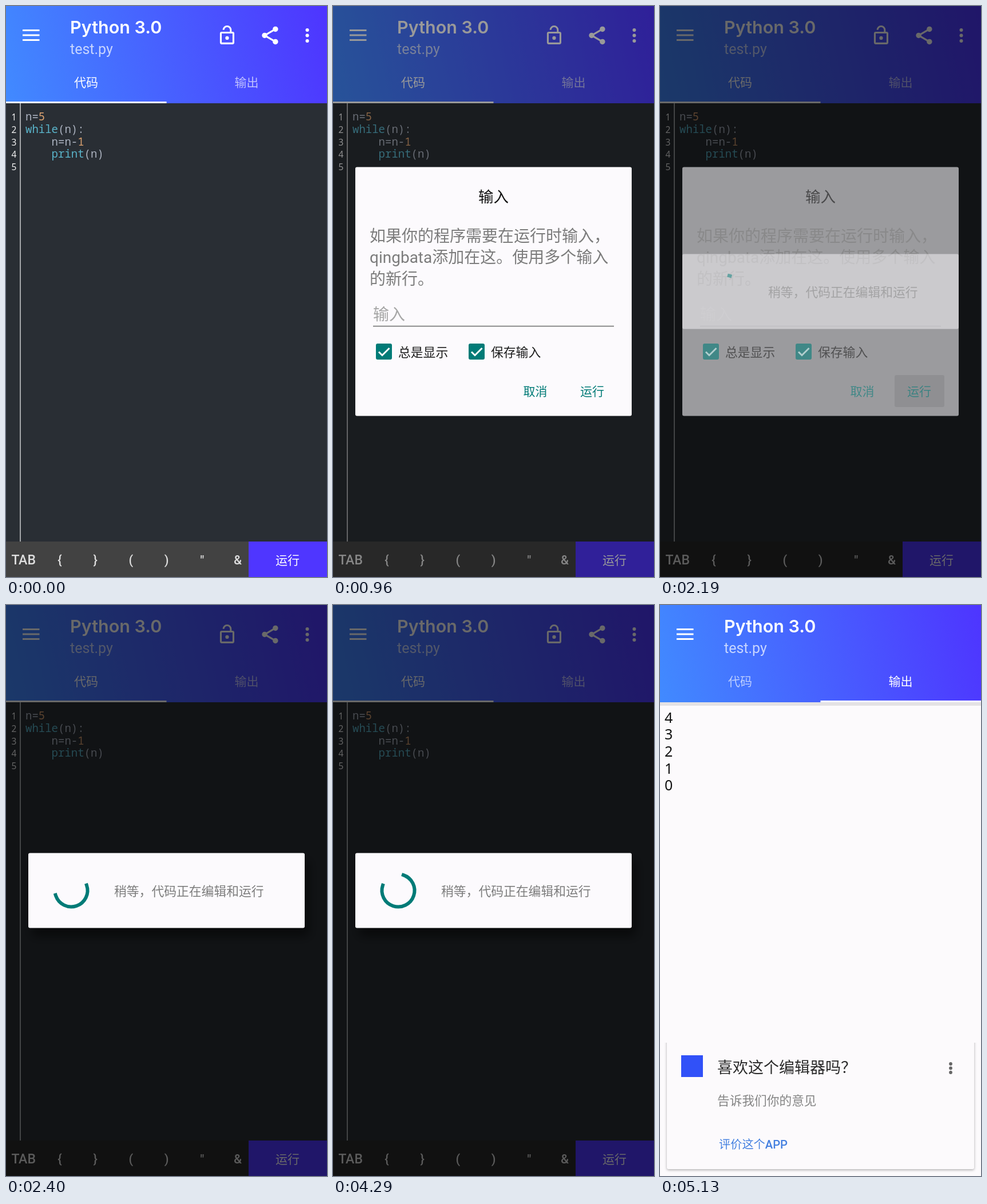
An HTML page with a canvas for the animation above (5.6 s loop, 561 by 998 pixels).

```html
<!DOCTYPE html>
<html lang="zh-CN">
<head>
<meta charset="utf-8">
<style>
  html, body { margin: 0; width: 561px; height: 998px; overflow: hidden; background: #292e34; }
  canvas { display: block; }
</style>
</head>
<body>
<canvas id="stage" width="561" height="998"></canvas>
<script>
const ctx = document.getElementById('stage').getContext('2d');
const W = 561, H = 998, LOOP = 5600, BAR = 170, TOOLS = 936;
const CJK = "Roboto, 'Noto Sans CJK SC', sans-serif";
const MONO = "'Noto Sans Mono', monospace";
const TEAL = '#007b77', WHITE = '#fff', PLAIN = '#abb2bf', KEY = '#5ab4ca', NUM = '#dba270';

const CODE = [
  [['n=', PLAIN], ['5', NUM]],
  [['while', KEY], ['(n):', PLAIN]],
  [['    n=n-', PLAIN], ['1', NUM]],
  [['    ', PLAIN], ['print', KEY], ['(n)', PLAIN]],
  []
];

const clamp = x => Math.max(0, Math.min(1, x));
const ramp = (t, from, to) => clamp((t - from) / (to - from));

// The picture is updated in 70 ms steps inside these spans and rests between them.
const SPANS = [[0, 0], [400, 680], [820, 820], [960, 960], [1090, 1160], [1710, 2130], [2260, 5130]];
function step(t) {
  const [start, end] = SPANS.filter(s => s[0] <= t).pop();
  return start + 70 * Math.floor((Math.min(t, end) - start) / 70);
}

function text(str, x, y, font, color, align = 'left') {
  ctx.font = font;
  ctx.fillStyle = color;
  ctx.textAlign = align;
  ctx.fillText(str, x, y);
}

function box(x, y, w, h, color, r = 0) {
  ctx.fillStyle = color;
  ctx.beginPath();
  ctx.roundRect(x, y, w, h, r);
  ctx.fill();
}

function dot(x, y, r, color) {
  ctx.fillStyle = color;
  ctx.beginPath();
  ctx.arc(x, y, r, 0, Math.PI * 2);
  ctx.fill();
}

function line(points, color, width) {
  ctx.strokeStyle = color;
  ctx.lineWidth = width;
  ctx.beginPath();
  points.forEach(p => ctx.lineTo(...p));
  ctx.stroke();
}

function withState(draw) {
  ctx.save();
  draw();
  ctx.restore();
}

function ripple(x, y, w, h, grow, color) {
  withState(() => {
    ctx.beginPath();
    ctx.roundRect(x, y, w, h, 3);
    ctx.clip();
    dot(x + w / 2, y + h / 2, Math.hypot(w, h) / 2 * grow, color);
  });
}

function lockIcon() {
  withState(() => {
    ctx.translate(367.6, 32.4);
    ctx.scale(1.57, 1.57);
    ctx.strokeStyle = WHITE;
    ctx.lineWidth = 2;
    ctx.beginPath();
    ctx.roundRect(5, 9, 14, 12, 1);
    ctx.stroke();
    dot(12, 15, 2, WHITE);
    ctx.lineWidth = 1.9;
    ctx.beginPath();
    ctx.moveTo(16.05, 9);
    ctx.lineTo(16.05, 6);
    ctx.arc(12, 6, 4.05, 0, Math.PI, true);
    ctx.stroke();
  });
}

function shareIcon() {
  withState(() => {
    ctx.translate(442.6, 32.6);
    ctx.scale(1.57, 1.57);
    const nodes = [[18, 5], [6, 12], [18, 19]];
    line(nodes, WHITE, 2);
    nodes.forEach(([x, y]) => dot(x, y, 3, WHITE));
  });
}

function header(slide) {
  const g = ctx.createLinearGradient(0, BAR, 570, 45);
  g.addColorStop(0, '#418aff');
  g.addColorStop(1, '#4e35ff');
  box(0, 0, W, BAR, g);

  for (const y of [41, 49.5, 58]) box(29, y, 29.5, 3, WHITE);
  text('Python 3.0', 112, 48, '600 30.5px Inter, sans-serif', WHITE);
  text('test.py', 112, 83.5, '25px Roboto, sans-serif', 'rgba(255,255,255,.7)');
  const tab = on => `rgba(255,255,255,${0.65 + 0.35 * on})`;
  text('代码', 140, 141, '500 21px ' + CJK, tab(1 - slide), 'center');
  text('输出', 420.5, 141, '500 21px ' + CJK, tab(slide), 'center');
  box(280.5 * slide, 167, 280.5, 3, WHITE);
  if (slide > 0) return;
  lockIcon();
  shareIcon();
  for (const y of [42, 51.5, 61]) dot(526.5, y, 3, WHITE);
}

function codePage(t, settled) {
  box(0, BAR, W, H - BAR, '#292e34');
  box(24.2, BAR, 1.6, TOOLS - BAR, '#c4c6c8');
  CODE.forEach((parts, i) => {
    const y = 200 + 21.8 * i;
    text(i + 1, 14, y, "15.5px 'Noto Sans', sans-serif", '#f0f0f0', 'center');
    let x = 34;
    for (const [str, color] of parts) {
      text(str, x, y, '19px ' + MONO, color);
      x += ctx.measureText(str).width;
    }
  });

  box(0, TOOLS, W, H - TOOLS, settled ? '#292929' : '#424242');
  text('TAB', 9.5, 976, '500 23px ' + CJK, '#dedede');
  [...'{}()"&'].forEach((c, i) => text(c, 94 + 62.2 * i, 976, '500 22px ' + CJK, '#dedede', 'center'));
  box(424, TOOLS, 137, H - TOOLS, '#4f36ff');
  if (t >= 400 && t < 820) {
    const glow = 0.2 * (1 - ramp(t, 640, 820));
    ripple(424, TOOLS, 137, 62, 0.3 + 0.7 * ramp(t, 400, 610), `rgba(255,255,255,${glow})`);
  }
  text('运行', 492, 976, '500 21px ' + CJK, WHITE, 'center');
}

function outputPage() {
  box(0, BAR, W, H - BAR, '#fcfafc');
  box(0, BAR, W, 6, '#e4e2e4');
  for (let i = 0; i < 5; i++) {
    text(4 - i, 8, 205.5 + 29.7 * i, "25px 'Noto Sans', sans-serif", '#111');
  }
  withState(() => {
    ctx.beginPath();
    ctx.rect(0, 765, W, H - 765);
    ctx.clip();
    ctx.shadowColor = 'rgba(0,0,0,.32)';
    ctx.shadowBlur = 4;
    ctx.shadowOffsetY = 1.5;
    box(12, 755, 537, 231, '#fcfafc', 3);
  });
  box(37, 787, 38, 38, '#3151f8');
  text('喜欢这个编辑器吗？', 100, 818, '27px ' + CJK, '#2a2a2a');
  text('告诉我们你的意见', 100, 874, '21.7px ' + CJK, '#858585');
  text('评价这个APP', 103, 950, '500 20.2px ' + CJK, '#4480e0');
  for (const y of [802, 809.5, 817]) dot(508, y, 2.9, '#666');
}

function panel(height, shadow) {
  withState(() => {
    if (shadow) {
      ctx.shadowColor = 'rgba(0,0,0,.5)';
      ctx.shadowBlur = 18;
      ctx.shadowOffsetX = 7;
      ctx.shadowOffsetY = 14;
    }
    box(39, 499 - height / 2, 483, height, '#fcfafd', 3);
  });
}

function checkbox(x, label) {
  box(x, 590, 28, 28, TEAL, 3);
  line([[x + 5, 604.5], [x + 11, 610.5], [x + 23.5, 598]], WHITE, 3);
  text(label, x + 39, 613, '21.8px ' + CJK, '#1c1c1c');
}

function inputDialog(t) {
  panel(435, t >= 1160 && t <= 2060);
  text('输入', 280.5, 342.5, '26.5px ' + CJK, '#111', 'center');
  ['如果你的程序需要在运行时输入，', 'qingbata添加在这。使用多个输入', '的新行。'].forEach((str, i) =>
    text(str, 64, 412 + 37.3 * i, '28px ' + CJK, '#7c7c7c'));
  text('输入', 70, 548.5, '28px ' + CJK, '#a6a6a6');
  box(70, 558.8, 421, 1.6, '#7c7c7c');
  checkbox(75, '总是显示');
  checkbox(237, '保存输入');
  if (t >= 1710) ripple(410, 645, 87, 56, 0.3 + 0.7 * ramp(t, 1710, 1920), 'rgba(0,0,0,.13)');
  text('取消', 353.5, 681, '500 21px ' + CJK, TEAL, 'center');
  text('运行', 453, 681, '500 21px ' + CJK, TEAL, 'center');
}

// Solves a cubic curve with y running 0, 0, 1, 1 for a given x.
function curve(x, a, b, c, d) {
  let lo = 0, hi = 1, s = 0.5;
  for (let i = 0; i < 24; i++) {
    s = (lo + hi) / 2;
    const u = 1 - s;
    const at = a * u ** 3 + 3 * b * u * u * s + 3 * c * u * s * s + d * s ** 3;
    if (at < x) lo = s; else hi = s;
  }
  return s * s * (3 - 2 * s);
}

function spinner(t) {
  const turns = Math.max(0, 0.217 + (t - 2400) / 1465);
  const cycle = Math.floor(turns), p = turns - cycle;
  const tail = p < 0.5 ? 0 : curve(p, 0.5, 0.7, 0.6, 1);
  const head = p > 0.5 ? 1 : curve(p, 0, 0.2, 0.1, 0.5);
  const base = 4 + 308 * turns + 270 * cycle - 90;
  const rad = deg => deg * Math.PI / 180;
  ctx.strokeStyle = TEAL;
  ctx.lineWidth = 6;
  ctx.lineCap = 'square';
  ctx.beginPath();
  ctx.arc(114, 499, 28.5, rad(base + 270 * tail), rad(base + 270 * head + 0.5));
  ctx.stroke();
  ctx.lineCap = 'butt';
}

function waitDialog(t, settled) {
  panel(131, settled && t >= 2260);
  spinner(t);
  text('稍等，代码正在编辑和运行', 189, 508, '21.8px ' + CJK, '#7c7c7c');
}

function fade(alpha, draw) {
  if (alpha <= 0) return;
  withState(() => {
    ctx.globalAlpha = alpha;
    draw();
  });
}

function render(t) {
  const settled = t >= 1160 && t < 4700;
  const dim = t < 960 ? 0 : (0.4 + 0.19 * ramp(t, 960, 1160)) * (1 - ramp(t, 4755, 4905));
  const slide = 1 - (1 - ramp(t, 4850, 5130)) ** 3;

  withState(() => {
    ctx.translate(-W * slide, 0);
    codePage(t, settled);
    if (slide > 0) {
      ctx.translate(W, 0);
      outputPage();
    }
  });
  header(slide);
  box(0, 0, W, H, `rgba(0,0,0,${dim})`);

  if (t >= 960) fade(1 - ramp(t, 2060, 2230), () => inputDialog(t));
  if (t >= 2060) fade(ramp(t, 2060, 2200) * (1 - ramp(t, 4670, 4833)), () => waitDialog(t, settled));
}

function frame() {
  render(step(performance.now() % LOOP));
  requestAnimationFrame(frame);
}
frame();
</script>
</body>
</html>
```
